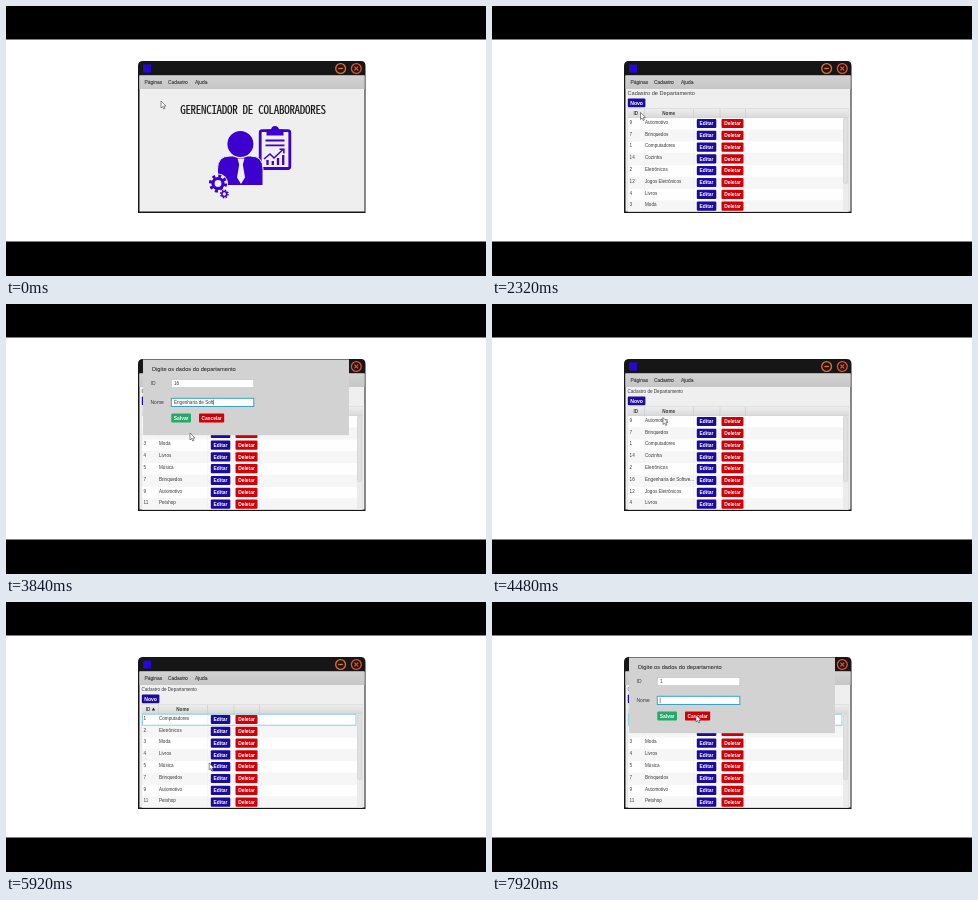
Write an HTML page that moves like this. It is 480 px wide and 270 px high and loops after 8000 ms.

```html
<!DOCTYPE html>
<html lang="pt-BR">
<head>
<meta charset="utf-8">
<title>Gerenciador de colaboradores</title>
<style>
html, body { margin: 0; width: 100%; height: 100%; overflow: hidden; background: #000; }
svg { display: block; width: 480px; height: 270px; }
text { font: 4.6px "Liberation Sans", Arial, sans-serif; fill: #3a3a3a; }
text.b { font-weight: 700; }
text.w { font-weight: 700; fill: #fff; text-anchor: middle; }
text.menu { font-size: 4.9px; stroke: #3a3a3a; stroke-width: .12px; }
text.head {
  font: 11px "Noto Sans Mono CJK JP", "Noto Sans CJK JP", "Noto Sans CJK", Roboto, sans-serif;
  font-feature-settings: "hwid"; letter-spacing: -.3px; fill: #151515;
  stroke: #151515; stroke-width: .15px; text-anchor: middle;
}
</style>
</head>
<body>
<svg viewBox="0 0 480 270">
  <defs>
    <linearGradient id="bar" x2="0" y2="1"><stop stop-color="#d2d2d2"/><stop offset="1" stop-color="#c6c6c6"/></linearGradient>
    <linearGradient id="th" x2="0" y2="1"><stop stop-color="#eee"/><stop offset="1" stop-color="#d8d8d8"/></linearGradient>
    <clipPath id="rowsClip"><rect x="136" y="112" width="220" height="93.3"/></clipPath>
  </defs>
  <rect y="33.5" width="480" height="202" fill="#fff"/>

  <path d="M132 207V60Q132 55 137 55H355Q359.5 55 359.5 60V207Z" fill="#161616"/>
  <rect x="133.5" y="69.5" width="225" height="136" fill="#efefef"/>
  <rect x="137" y="58.5" width="8" height="8" fill="#2607d8"/>
  <g fill="#241510" stroke-width="1.3">
    <circle cx="334.6" cy="62.5" r="4.9" stroke="#d9752f"/>
    <circle cx="350.3" cy="62.5" r="4.9" stroke="#dd5138"/>
    <path d="M332.3 62.5h4.6" stroke="#d9752f"/>
    <path d="M348.4 60.6l3.8 3.8m0-3.8l-3.8 3.8" stroke="#dd5138"/>
  </g>
  <rect x="133.5" y="69.5" width="225" height="13.5" fill="url(#bar)"/>
  <rect id="hot" x="159" y="71.3" width="26.3" height="10.2" fill="#0a93c4"/>
  <text class="menu" x="138.5" y="78">Páginas</text>
  <text class="menu" id="cad" x="162" y="78">Cadastro</text>
  <text class="menu" x="189" y="78">Ajuda</text>

  <g id="home">
    <text class="head" x="247" y="108">GERENCIADOR DE COLABORADORES</text>
    <g fill="#3c00cf">
      <rect x="254.2" y="124.7" width="29.6" height="37.8" rx="2" fill="#efefef" stroke="#3c00cf" stroke-width="2.8"/>
      <path d="M260.5 129.5V123.5H265Q265.5 120 269 120T273 123.5H277.5V129.5Z"/>
      <path d="M259.5 134.5h19M259.5 139.3h19" stroke="#3c00cf" stroke-width="1.8"/>
      <path d="M258 153l6-5 4 4 9-8.5M273.5 143.2h4.4v4.4" fill="none" stroke="#3c00cf" stroke-width="1.5"/>
      <path d="M261.5 159v-5M266.8 159v-4M272 159v-7M277.2 159v-10" stroke="#3c00cf" stroke-width="2.3"/>
      <path d="M211.5 179.5V163Q211.5 150 224 150H244.5Q257 150 257 163V179.5Z" stroke="#efefef"/>
      <path d="M231.5 152.5H238.5L236.8 158.5 239 171.5 235 178 231 171.5 233.2 158.5Z" fill="#efefef"/>
      <circle cx="234.4" cy="138" r="13.6" stroke="#efefef" stroke-width="1.2"/>
    </g>
    <g id="gears"></g>
  </g>

  <g id="page">
    <text id="title" x="135.5" y="89.3">Cadastro de Departamento</text>
    <rect x="135.8" y="92.5" width="17.6" height="8.8" rx="1" fill="#1d0a9e"/>
    <text class="w" x="144.6" y="98.7" style="font-size:5.1px">Novo</text>
    <rect x="136" y="102.7" width="220.5" height="103" fill="#fff" stroke="#c8c8c8" stroke-width=".5"/>
    <rect x="136" y="102.8" width="220.5" height="9" fill="url(#th)"/>
    <path d="M152.5 103v9M201.5 103v9M228 103v9M253.5 103v9M136 111.8h220.5" stroke="#c2c2c2" stroke-width=".5"/>
    <text class="b" id="idHead" y="109.2">ID</text>
    <text class="b" x="170.3" y="109.2">Nome</text>
    <path id="arrow" d="M145.8 108.5l1.7-3 1.7 3Z" fill="#222"/>
    <g id="rows" clip-path="url(#rowsClip)"></g>
    <rect id="sel" x="136.5" y="112.2" width="213.5" height="11" fill="none" stroke="#7cc6d4" stroke-width=".8"/>
    <rect x="351" y="112" width="5.3" height="93.5" fill="#ebebeb"/>
    <rect x="351.5" y="112.5" width="4.2" height="65" rx="1.5" fill="#e0e0e0" stroke="#c6c6c6" stroke-width=".4"/>
  </g>

  <g id="popup">
    <rect x="159.5" y="83" width="38.5" height="20" fill="#000" opacity=".18"/>
    <rect x="159" y="82" width="38" height="20" fill="#f6f6f6" stroke="#c4c4c4" stroke-width=".5"/>
    <text class="b" x="161.2" y="88.7">Vendedor(a)</text>
    <rect id="item" x="159.5" y="92.5" width="37" height="9" fill="#c4c4c4"/>
    <text id="dep" class="b" x="161.2" y="98.7">Departamento</text>
  </g>

  <g id="dialog">
    <rect x="137" y="55.5" width="206" height="75.7" fill="#d2d2d2"/>
    <text x="146" y="66.7" style="font-size:5.7px;stroke:#3a3a3a;stroke-width:.1px">Digite os dados do departamento</text>
    <text x="144.5" y="81.3" style="font-size:5px">ID</text>
    <text x="144.5" y="100.2" style="font-size:5px">Nome</text>
    <rect class="box" x="165.3" y="75.5" width="82.5" height="8.2" fill="#fff"/>
    <rect class="box" x="165.3" y="94.3" width="82.5" height="8.2" fill="#fff"/>
    <rect id="pick" x="167.5" y="95.5" width="29" height="5.8" fill="#0a93c4"/>
    <text id="idVal" x="168" y="81.3"></text>
    <text id="nameVal" x="168" y="100.1"></text>
    <path id="caret" stroke="#222" stroke-width=".5"/>
    <rect x="165.3" y="109.5" width="19.7" height="9" rx="1" fill="#25a96a"/>
    <text class="w" x="175.2" y="115.7" style="font-size:4.9px">Salvar</text>
    <rect x="193" y="109.5" width="25.2" height="9" rx="1" fill="#cf0008"/>
    <text class="w" x="205.6" y="115.7" style="font-size:4.8px">Cancelar</text>
  </g>

  <path id="cursor" d="M0 0V7L1.6 5.5 2.7 8 3.9 7.5 2.8 5.1H5Z" fill="#fff" stroke="#444" stroke-width=".6"/>
</svg>
<script>
const LOOP = 8000, STEP = 80;
const $ = id => document.getElementById(id);
const show = (id, on) => { $(id).style.display = on ? "" : "none"; };

const depts = [
  [1, "Computadores"], [2, "Eletrônicos"], [3, "Moda"], [4, "Livros"], [5, "Música"],
  [7, "Brinquedos"], [9, "Automotivo"], [11, "Petshop"], [12, "Jogos Eletrônicos"], [14, "Cozinha"]
];
const added = [16, "Engenharia de Softwe..."];
const newName = "Engenharia de Software", oldName = "Computadores";
const byName = list => [...list].sort((a, b) => a[1].localeCompare(b[1], "pt"));
const lists = { name: byName(depts), id: depts, more: byName([...depts, added]) };

// time, x, y of the pointer tip
const path = [
  [0, 155, 95], [320, 160, 88], [640, 171, 76], [800, 171, 76], [1040, 171.5, 94], [1280, 171.5, 95],
  [1760, 162, 103], [2320, 148.5, 106.5], [2400, 148, 106.5], [2560, 146, 97], [2720, 150, 104],
  [3040, 184, 129], [3840, 184, 129], [4160, 176, 114], [4320, 175, 114], [4480, 171, 113.5],
  [4720, 170, 114], [5120, 146, 106], [5280, 146, 106], [5520, 166, 117], [5680, 176, 130],
  [5920, 203.2, 161], [6080, 213, 118], [6240, 213, 118], [6560, 199, 98], [6960, 184, 98],
  [7200, 190, 104], [7680, 204, 113], [8000, 204, 113]
];

function pointAt(t) {
  const i = Math.max(1, path.findIndex(p => p[0] > t));
  const [a, b] = [path[i - 1], path[i]];
  const u = (t - a[0]) / (b[0] - a[0]), k = u * u * (3 - 2 * u);
  return [a[1] + (b[1] - a[1]) * k, a[2] + (b[2] - a[2]) * k];
}

const typed = (s, t, from, to) => s.slice(0, Math.round(s.length * Math.min(1, Math.max(0, (t - from) / (to - from)))));

const button = (x, y, w, color, label) =>
  `<rect x="${x}" y="${y + .9}" width="${w}" height="9.2" rx="1" fill="${color}"/>
   <text class="w" x="${x + w / 2}" y="${y + 7.2}" style="font-size:4.9px">${label}</text>`;

const row = ([id, name], i) => {
  const y = 112 + i * 11.8;
  return `<rect x="136.3" y="${y}" width="215" height="11.8" fill="${i % 2 ? "#f6f6f6" : "#fefefe"}"/>
    <path d="M136 ${y + 11.8}h215M152.5 ${y}v11.8M201.5 ${y}v11.8M228 ${y}v11.8M253.5 ${y}v11.8" stroke="#ececec" stroke-width=".4"/>
    <text x="137.6" y="${y + 5.8}">${id}</text><text x="153" y="${y + 5.8}">${name}</text>` +
    button(204.8, y, 19.5, "#1d0a9e", "Editar") + button(229.5, y, 22, "#cf0008", "Deletar");
};

let current;
function setList(key) {
  if (key === current) return;
  current = key;
  $("rows").innerHTML = lists[key].slice(0, 8).map(row).join("");
}

function gear(x, y, r) {
  const c = 2 * Math.PI * r / 16;
  const ring = (radius, width, dash = "") =>
    `<circle cx="${x}" cy="${y}" r="${radius}" fill="none" stroke="#3c00cf" stroke-width="${width}" ${dash}/>`;
  return `<circle cx="${x}" cy="${y}" r="${r * 1.32}" fill="#efefef"/>` +
    ring(r, r * .4, `stroke-dasharray="${c}"`) + ring(r * .66, r * .42);
}
$("gears").innerHTML = gear(212, 177.5, 7.6) + gear(218.3, 188, 3.7);

function draw(t) {
  const menu = t >= 720 && t < 1200, home = t < 1280;
  const adding = t >= 2640 && t < 4320, editing = t >= 6160;
  const sorted = t >= 2400 && t < 4320 || t >= 5280;
  const [x, y] = pointAt(t);

  show("home", home);
  show("page", !home);
  show("popup", menu);
  show("hot", menu);
  $("cad").style.fill = $("cad").style.stroke = menu ? "#fff" : "";
  show("item", y > 90);
  $("dep").style.fill = y > 90 ? "#e9e9e9" : "";

  setList(sorted ? "id" : t < 4320 ? "name" : "more");
  show("arrow", sorted);
  $("idHead").setAttribute("x", sorted ? 139.7 : 141.5);
  show("sel", t >= 5520);
  $("title").style.fontSize = t < 4320 ? "5.6px" : "";

  show("dialog", adding || editing);
  const idVal = editing ? "1" : typed("16", t, 3120, 3360);
  const nameVal = editing ? (t < 7040 ? oldName : "") : typed(newName, t, 3520, 3920);
  const field = editing ? +(t >= 6560) : +(t >= 3440);
  $("idVal").textContent = idVal;
  $("nameVal").textContent = nameVal;
  show("pick", editing && t >= 6800 && t < 7040);
  document.querySelectorAll(".box").forEach((box, i) => {
    box.setAttribute("stroke", i === field ? "#36a5c5" : "#b6b6b6");
    box.setAttribute("stroke-width", i === field ? 1 : .5);
  });
  if (adding || editing) {
    const val = $(field ? "nameVal" : "idVal");
    const w = val.textContent ? val.getComputedTextLength() : 0;
    $("caret").setAttribute("d", `M${168.2 + w} ${field ? 95.6 : 76.8}v5.6`);
  }
  show("caret", t % 960 < 560);
  $("cursor").setAttribute("transform", `translate(${x} ${y})`);
}

function tick() {
  draw(Math.floor(performance.now() % LOOP / STEP) * STEP);
  requestAnimationFrame(tick);
}
tick();
</script>
</body>
</html>
```
